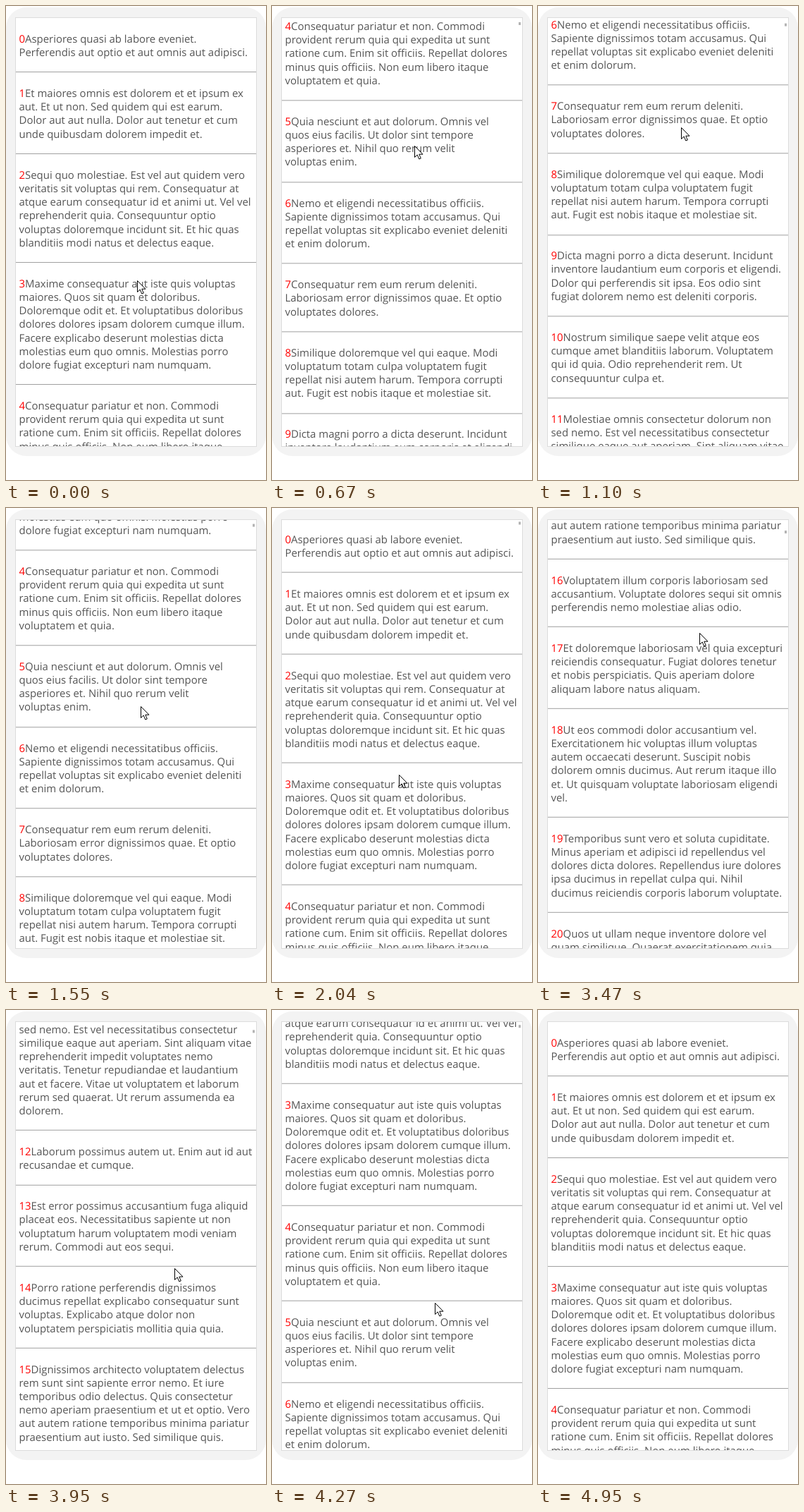
These frames come from a looping animation (369x672 px, 5.61 s). An HTML page:

```html
<!DOCTYPE html>
<html lang="la">
<head>
<meta charset="utf-8">
<title>Scrolling list</title>
<style>
html, body { margin: 0; width: 100%; height: 100%; overflow: hidden; background: #fff; }
svg { display: block; width: 100%; height: 100%; }
text { font: 14.93px "Open Sans", "Noto Sans", sans-serif; fill: #555; text-rendering: geometricPrecision; }
.num { fill: #f00; }
</style>
</head>
<body>
<svg viewBox="0 0 369 672">
  <clipPath id="view"><rect x="14" y="17" width="341" height="607"/></clipPath>
  <rect y="2" width="369" height="636" rx="29" fill="#f3f3f3"/>
  <rect x="13.5" y="16.5" width="342" height="608" fill="#fff" stroke="#dcdcdc"/>
  <g clip-path="url(#view)">
    <g id="list"></g>
    <rect id="thumb" x="350" width="3" height="4" fill="#b4b4b4"/>
  </g>
  <path id="cursor" d="M.5 .5V16.5L4.2 13L6.8 19L9.3 18L6.8 12.2H12Z" fill="#fff" stroke="#000"/>
</svg>
<script>
const LOOP = 5610, TOP = 16.6, LINE = 19.2, PAD = 38.85;

const items = [
  'Asperiores quasi ab labore eveniet.|Perferendis aut optio et aut omnis aut adipisci.',
  'Et maiores omnis est dolorem et et ipsum ex|aut. Et ut non. Sed quidem qui est earum.|Dolor aut aut nulla. Dolor aut tenetur et cum|unde quibusdam dolorem impedit et.',
  'Sequi quo molestiae. Est vel aut quidem vero|veritatis sit voluptas qui rem. Consequatur at|atque earum consequatur id et animi ut. Vel vel|reprehenderit quia. Consequuntur optio|voluptas doloremque incidunt sit. Et hic quas|blanditiis modi natus et delectus eaque.',
  'Maxime consequatur aut iste quis voluptas|maiores. Quos sit quam et doloribus.|Doloremque odit et. Et voluptatibus doloribus|dolores dolores ipsam dolorem cumque illum.|Facere explicabo deserunt molestias dicta|molestias eum quo omnis. Molestias porro|dolore fugiat excepturi nam numquam.',
  'Consequatur pariatur et non. Commodi|provident rerum quia qui expedita ut sunt|ratione cum. Enim sit officiis. Repellat dolores|minus quis officiis. Non eum libero itaque|voluptatem et quia.',
  'Quia nesciunt et aut dolorum. Omnis vel|quos eius facilis. Ut dolor sint tempore|asperiores et. Nihil quo rerum velit|voluptas enim.',
  'Nemo et eligendi necessitatibus officiis.|Sapiente dignissimos totam accusamus. Qui|repellat voluptas sit explicabo eveniet deleniti|et enim dolorum.',
  'Consequatur rem eum rerum deleniti.|Laboriosam error dignissimos quae. Et optio|voluptates dolores.',
  'Similique doloremque vel qui eaque. Modi|voluptatum totam culpa voluptatem fugit|repellat nisi autem harum. Tempora corrupti|aut. Fugit est nobis itaque et molestiae sit.',
  'Dicta magni porro a dicta deserunt. Incidunt|inventore laudantium eum corporis et eligendi.|Dolor qui perferendis sit ipsa. Eos odio sint|fugiat dolorem nemo est deleniti corporis.',
  'Nostrum similique saepe velit atque eos|cumque amet blanditiis laborum. Voluptatem|qui id quia. Odio reprehenderit rem. Ut|consequuntur culpa et.',
  'Molestiae omnis consectetur dolorum non|sed nemo. Est vel necessitatibus consectetur|similique eaque aut aperiam. Sint aliquam vitae|reprehenderit impedit voluptates nemo|veritatis. Tenetur repudiandae et laudantium|aut et facere. Vitae ut voluptatem et laborum|rerum sed quaerat. Ut rerum assumenda ea|dolorem.',
  'Laborum possimus autem ut. Enim aut id aut|recusandae et cumque.',
  'Est error possimus accusantium fuga aliquid|placeat eos. Necessitatibus sapiente ut non|voluptatum harum voluptatem modi veniam|rerum. Commodi aut eos sequi.',
  'Porro ratione perferendis dignissimos|ducimus repellat explicabo consequatur sunt|voluptas. Explicabo atque dolor non|voluptatem perspiciatis mollitia quia quia.',
  'Dignissimos architecto voluptatem delectus|rem sunt sint sapiente error nemo. Et iure|temporibus odio delectus. Quis consectetur|nemo aperiam praesentium et ut et optio. Vero|aut autem ratione temporibus minima pariatur|praesentium aut iusto. Sed similique quis.',
  'Voluptatem illum corporis laboriosam sed|accusantium. Voluptate dolores sequi sit omnis|perferendis nemo molestiae alias odio.',
  'Et doloremque laboriosam vel quia excepturi|reiciendis consequatur. Fugiat dolores tenetur|et nobis perspiciatis. Quis aperiam dolore|aliquam labore natus aliquam.',
  'Ut eos commodi dolor accusantium vel.|Exercitationem hic voluptas illum voluptas|autem occaecati deserunt. Suscipit nobis|dolorem omnis ducimus. Aut rerum itaque illo|et. Ut quisquam voluptate laboriosam eligendi|vel.',
  'Temporibus sunt vero et soluta cupiditate.|Minus aperiam et adipisci id repellendus vel|dolores dicta dolores. Repellendus iure dolores|ipsa ducimus in repellat culpa qui. Nihil|ducimus reiciendis corporis laborum voluptate.',
  'Quos ut ullam neque inventore dolore vel|quam similique. Quaerat exercitationem quia|voluptas et aut. Rerum sit dolorem|molestiae quo. Et velit nihil.',
  'Autem sit rerum et voluptas. Quo dolor|nulla et eius.'
];

// Rows of [time, value, ...]
const scrollKeys = [
  [30, 0], [300, 210], [590, 470], [850, 670], [1100, 790.5], [1230, 805],
  [1500, 540], [1800, 150], [2040, 2.5], [2070, 0], [2200, 70], [2450, 340],
  [2890, 860.5], [3200, 1460], [3470, 1928.5], [3590, 1980], [3950, 1370.5],
  [4200, 500], [4390, 0]
];
const cursorKeys = [
  [30, 186, 389], [400, 196, 245], [800, 203, 185], [1100, 203, 172], [1250, 201, 180],
  [1700, 186, 330], [2040, 180, 378], [2450, 212, 330], [2890, 241, 269], [3250, 232, 195],
  [3470, 229, 177], [3590, 230, 185], [3950, 239, 366], [4390, 229, 420], [4690, 229, 420],
  [4950, 312, 674]
];

// Monotone cubic through the keys, flat at both ends
function track(keys, col, t) {
  const last = keys.length - 1;
  if (t <= keys[0][0]) return keys[0][col];
  if (t >= keys[last][0]) return keys[last][col];
  const slope = i => (keys[i + 1][col] - keys[i][col]) / (keys[i + 1][0] - keys[i][0]);
  const tangent = i => {
    if (i === 0 || i === last) return 0;
    const a = slope(i - 1), b = slope(i);
    return a * b > 0 ? 2 * a * b / (a + b) : 0;
  };
  const i = keys.findIndex(k => k[0] > t) - 1;
  const [p, q] = [keys[i], keys[i + 1]];
  const d = q[0] - p[0], u = (t - p[0]) / d, v = 1 - u;
  return v * v * (1 + 2 * u) * p[col] + u * u * (1 + 2 * v) * q[col]
    + d * u * v * (v * tangent(i) - u * tangent(i + 1));
}

const $ = id => document.getElementById(id);
const list = $('list'), thumb = $('thumb'), cursor = $('cursor');

function buildList() {
  let y = TOP, out = '';
  items.forEach((item, n) => {
    const lines = item.split('|');
    lines.forEach((line, i) => {
      const num = i ? '' : `<tspan class="num">${n}</tspan>`;
      out += `<text x="18.5" y="${Math.round(y + 35.2 + i * LINE)}">${num}${line}</text>`;
    });
    y += lines.length * LINE + PAD;
    out += `<rect x="14" y="${Math.floor(y)}" width="341" height="1" fill="#a0a0a0"/>`;
  });
  list.innerHTML = out;
}

function draw(t) {
  const scroll = track(scrollKeys, 1, t);
  list.setAttribute('transform', `translate(0 ${-scroll})`);
  thumb.setAttribute('y', 19.5 + scroll * 0.0065);
  thumb.setAttribute('visibility', t >= 30 && t < 4800 ? 'visible' : 'hidden');
  const x = Math.round(track(cursorKeys, 1, t)), y = Math.round(track(cursorKeys, 2, t));
  cursor.setAttribute('transform', `translate(${x} ${y})`);
  cursor.setAttribute('visibility', t < 4950 ? 'visible' : 'hidden');
}

function tick() {
  draw(performance.now() % LOOP);
  requestAnimationFrame(tick);
}

buildList();
tick();
</script>
</body>
</html>
```
